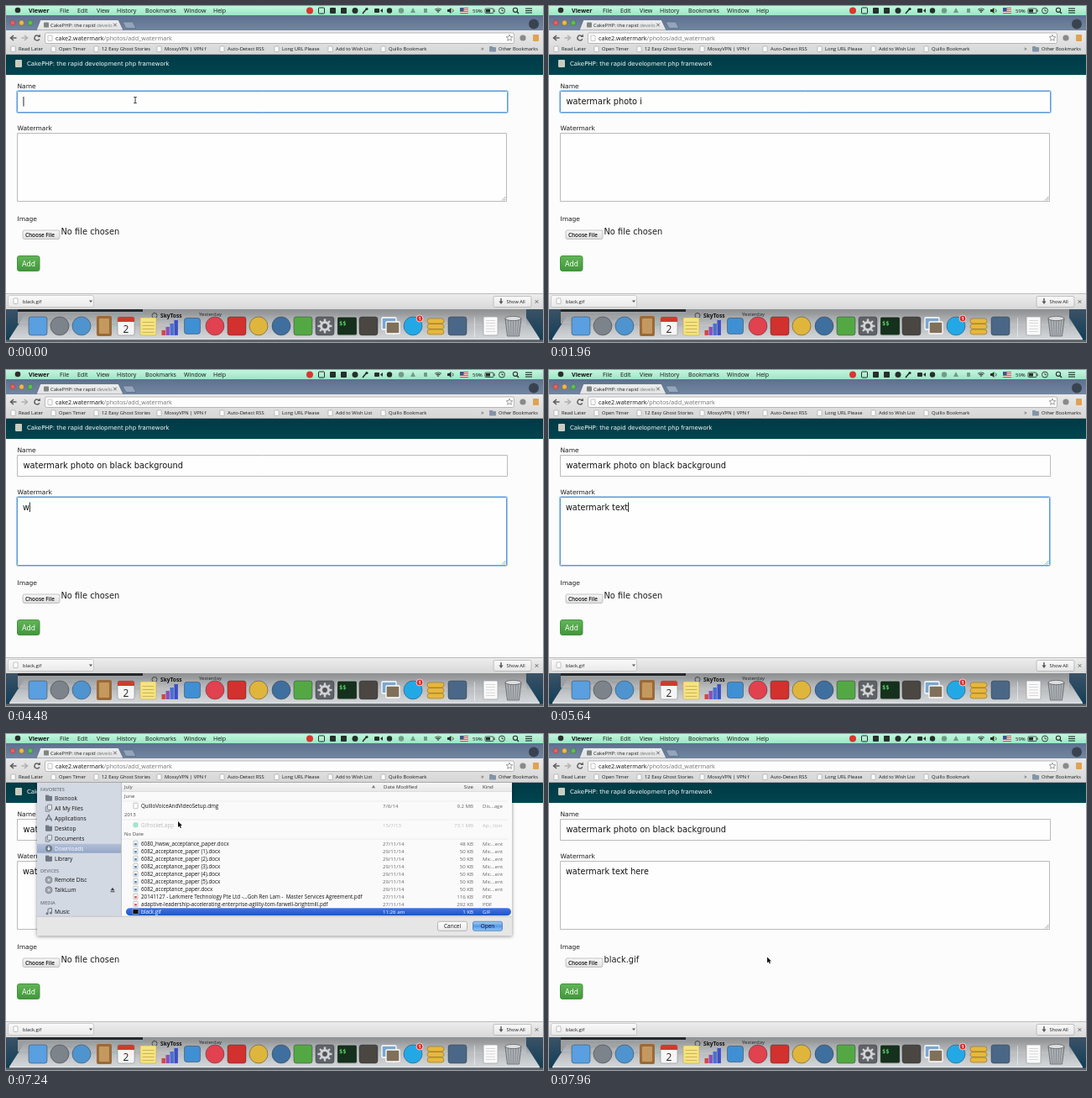
An HTML page with a canvas for the animation above (8000 ms loop, 640 by 400 pixels).

```html
<!DOCTYPE html>
<html lang="en">
<head>
<meta charset="utf-8">
<title>Add watermark</title>
<style>
html, body { margin: 0; width: 100%; height: 100%; overflow: hidden; background: #fcfcfc; }
canvas { display: block; width: 640px; height: 400px; }
</style>
</head>
<body>
<canvas id="stage"></canvas>
<script>
const LOOP = 8000;
const UI = '"Open Sans", sans-serif';
const PAGE = '"DejaVu Sans", sans-serif';
const canvas = document.getElementById('stage');
const ctx = canvas.getContext('2d');
const dpr = window.devicePixelRatio || 1;
canvas.width = 640 * dpr;
canvas.height = 400 * dpr;

// ---------- drawing helpers ----------
function grad(y0, y1, ...colors) {
  const g = ctx.createLinearGradient(0, y0, 0, y1);
  colors.forEach((c, i) => g.addColorStop(i / (colors.length - 1), c));
  return g;
}
function rect(x, y, w, h, fill) {
  ctx.fillStyle = fill;
  ctx.fillRect(x, y, w, h);
}
function paint(fill, stroke, lw) {
  if (fill) { ctx.fillStyle = fill; ctx.fill(); }
  if (stroke) { ctx.strokeStyle = stroke; ctx.lineWidth = lw; ctx.stroke(); }
}
function box(x, y, w, h, r, fill, stroke, lw = 1) {
  ctx.beginPath();
  ctx.roundRect(x, y, w, h, r);
  paint(fill, stroke, lw);
}
function disc(x, y, r, fill, stroke, lw = 1) {
  ctx.beginPath();
  ctx.arc(x, y, r, 0, 7);
  paint(fill, stroke, lw);
}
function poly(points, fill, stroke, lw = 1) {
  ctx.beginPath();
  points.forEach(([x, y]) => ctx.lineTo(x, y));
  if (fill) ctx.closePath();
  paint(fill, stroke, lw);
}
function arc(x, y, r, a, b, color, lw = 1) {
  ctx.beginPath();
  ctx.arc(x, y, r, a, b);
  paint(null, color, lw);
}
function text(s, x, y, size, color = '#1a1a1a', weight = 500, family = UI, align = 'left') {
  ctx.font = `${weight} ${size}px ${family}`;
  ctx.textAlign = align;
  ctx.fillStyle = color;
  ctx.fillText(s, x, y);
}
const pageText = (s, x, y, size, color = '#1c1c1c') => text(s, x, y, size, color, 400, PAGE);
function cross(x, y, r, color) {
  poly([[x - r, y - r], [x + r, y + r]], null, color);
  poly([[x + r, y - r], [x - r, y + r]], null, color);
}
function clipTo(x, y, w, h, draw) {
  ctx.save();
  ctx.beginPath();
  ctx.rect(x, y, w, h);
  ctx.clip();
  draw();
  ctx.restore();
}

// ---------- timing ----------
const clamp = (v, a = 0, b = 1) => Math.min(b, Math.max(a, v));
const smooth = p => p * p * (3 - 2 * p);
// keys: [time, value, value...]; eased between neighbours
function track(keys, t) {
  let i = 0;
  while (i < keys.length - 2 && t >= keys[i + 1][0]) i++;
  const a = keys[i], b = keys[i + 1];
  const p = smooth(clamp((t - a[0]) / (b[0] - a[0])));
  return a.slice(1).map((v, k) => v + (b[k + 1] - v) * p);
}
function typed(s, t, start, step, from = 0) {
  return s.slice(0, from + clamp(Math.floor((t - start) / step) + 1, 0, s.length - from));
}

const CLICK = 6720, LISTED = 7000, CLOSED = 7390;
const nameText = t => t < 2080
  ? typed('watermark photo i', t, 440, 93)
  : typed('watermark photo on black background', t, 2200, 83, 16);
const markText = t => typed('watermark text here', t, 4400, 93);
const sheetBottom = t => track([[6800, 58], [6994, 265], [7200, 265], [CLOSED, 58]], t)[0];

// ---------- menu bar ----------
function menuBar() {
  rect(0, 0, 640, 11, grad(0, 11, '#c2f6de', '#9ae8c4'));
  disc(14, 5, 3.3, '#2a2f2c');
  text('Viewer', 27, 8.3, 7.2, '#111', 700);
  [['File', 64], ['Edit', 85], ['View', 108], ['History', 132], ['Bookmarks', 166],
   ['Window', 212], ['Help', 247]].forEach(([s, x]) => text(s, x, 8.3, 7, '#111'));

  const ink = '#24302b';
  disc(362, 5.5, 4, '#d9362f');
  box(372.5, 2, 7, 7, 1, null, ink);
  box(386, 2, 7, 7, 1, ink);
  box(399, 2, 7, 7, 1, ink);
  disc(416, 5.5, 3.5, ink);
  poly([[425, 9], [430, 3]], null, ink, 1.6);
  disc(430, 3.5, 1.6, ink);
  box(439, 3, 6, 5, 1, ink);
  poly([[446, 5.5], [449, 3], [449, 8]], ink);
  disc(457, 5.5, 3.2, ink);
  disc(471, 5.5, 3.2, '#6f9c87');
  poly([[482, 8], [485, 2], [488, 8]], '#6f9c87');
  box(498, 3, 4, 5, 0.5, '#6f9c87');
  [1.5, 3.5, 5.5].forEach(r => arc(515, 8.5, r, -2.3, -0.84, ink, 1.1));
  poly([[526, 4], [528, 4], [530.5, 2], [530.5, 9], [528, 7], [526, 7]], ink);
  arc(530.5, 5.5, 2.5, -0.9, 0.9, ink, 0.8);
  rect(541, 2, 10, 7, '#f4f4f4');
  for (let i = 0; i < 4; i++) rect(541, 2 + i * 2, 10, 1, '#c4474a');
  rect(541, 2, 4.5, 4, '#3d5590');
  text('59%', 556, 7.8, 6, '#111');
  box(571, 3, 10, 5.5, 1, null, ink, 0.8);
  rect(572, 4, 5, 3.5, ink);
  rect(581.5, 4.5, 1, 2.5, ink);
  disc(591, 5.5, 3.5, null, ink, 0.9);
  poly([[591, 3.5], [591, 5.7], [593, 5.7]], null, ink, 0.8);
  disc(607, 4.8, 2.6, null, ink, 1.1);
  poly([[609, 6.8], [611, 9]], null, ink, 1.3);
  for (let i = 0; i < 3; i++) rect(619, 2.5 + i * 2.5, 8, 1.1, ink);
}

// ---------- browser frame ----------
function pageIcon(x, y) {
  box(x, y, 5, 6.5, 0.5, '#fff', '#9c9c9c', 0.6);
}
function browserFrame() {
  rect(0, 11, 640, 18, grad(11, 29, '#5d7090', '#73869f'));
  [['#ee5f56', 8], ['#f4b83d', 18.5], ['#5cc14a', 29]].forEach(([c, x]) =>
    disc(x, 20, 2.9, c, 'rgba(0,0,0,.3)', 0.6));
  poly([[36, 29], [41, 16.5], [134, 16.5], [140, 29]], grad(16, 29, '#eceeef', '#e2e2e2'), '#4f617c', 0.7);
  box(45, 19.5, 6, 6, 1, '#7f8682');
  text('CakePHP: the rapid', 53, 25, 6, '#222');
  const w = ctx.measureText('CakePHP: the rapid ').width;
  text('develo', 53 + w, 25, 6, '#777');
  cross(130, 22.5, 1.8, '#666');
  poly([[139, 19], [151, 19], [155, 26.5], [143, 26.5]], '#94a5bb', '#55677f', 0.7);
  disc(629, 21.5, 6, '#39434f');

  rect(0, 29, 640, 29, grad(29, 58, '#e9e9e9', '#d6d6d6'));
  const arrow = (x, d, c) => {
    poly([[x - 3.5 * d, 38], [x + 3.5 * d, 38]], null, c, 1.4);
    poly([[x, 35], [x + 3.5 * d, 38], [x, 41]], null, c, 1.4);
  };
  arrow(9, -1, '#555');
  arrow(22, 1, '#aeaeae');
  arc(37, 38, 3, 0.4, 5.5, '#555', 1.3);
  poly([[37.5, 36.8], [41, 37], [40.6, 33.6]], '#555');
  box(46.5, 32, 559, 12.5, 2, '#fdfdfd', '#a9a9a9', 0.8);
  pageIcon(50, 35);
  text('cake2.watermark', 59, 40.8, 7.2, '#1a1a1a');
  const host = ctx.measureText('cake2.watermark').width;
  text('/photos/add_watermark', 59 + host, 40.8, 7.2, '#757575');
  const star = Array.from({ length: 11 }, (_, i) => {
    const r = i % 2 ? 1.8 : 4, a = i * Math.PI / 5 - Math.PI / 2;
    return [600 + r * Math.cos(a), 38 + r * Math.sin(a)];
  });
  poly(star, null, '#888', 0.8);
  disc(616, 38, 3.6, '#8a8a8a');
  box(628, 34, 7, 8, 1, '#e0a253');

  [['Read Later', 15], ['Open Timer', 63], ['12 Easy Ghost Stories', 114], ['MossyVPN | VPN f', 189],
   ['Auto-Detect RSS', 264], ['Long URL Please', 329], ['Add to Wish List', 393],
   ['Quillo Bookmark', 456]].forEach(([s, x]) => {
    pageIcon(x - 9, 48);
    text(s, x, 53.4, 5.8);
  });
  text('»', 566, 53, 7, '#555');
  box(576, 49, 8, 5.5, 0.8, '#8494a8');
  rect(576, 48, 4, 1.5, '#8494a8');
  text('Other Bookmarks', 587, 53.4, 5.7);
  rect(0, 57, 640, 1, '#a5a8a9');
}

// ---------- web page ----------
function field(x, y, w, h, focused) {
  if (focused) {
    box(x - 0.5, y - 0.5, w + 1, h + 1, 2, null, 'rgba(100,160,225,.55)', 2.2);
    box(x, y, w, h, 1, '#fefefe', '#5c98d6', 1);
  } else {
    box(x, y, w, h, 0, '#fefefe', '#b4b4b4', 0.9);
  }
}
function page(t) {
  rect(0, 58, 640, 285, '#fcfcfc');
  rect(0, 58, 640, 24, grad(58, 82, '#003a45', '#00454f'));
  box(11, 64, 8, 9, 1, '#c9cdc0');
  pageText('CakePHP: the rapid development php framework', 25, 71.3, 6.95, '#fff');

  const inName = t < 4250;
  const inMark = !inName && t < CLICK;
  const caretOn = t % 1100 < 550;
  const name = nameText(t), mark = markText(t);
  pageText('Name', 13.5, 98, 7.5);
  field(13.5, 101.5, 584, 25, inName);
  pageText(name, 20.5, 117.3, 9.83, '#111');
  if (inName && caretOn) rect(20.5 + ctx.measureText(name).width, 108, 0.9, 11.5, '#111');

  pageText('Watermark', 13.5, 148, 7.5);
  field(13.5, 151.5, 583, 81, inMark);
  pageText(mark, 20, 166.8, 9.65, '#111');
  if (inMark && caretOn) rect(20 + ctx.measureText(mark).width, 157.5, 0.9, 11.5, '#111');
  for (const d of [2, 4.5]) poly([[595.5 - d, 231.5], [595.5, 231.5 - d]], null, '#888', 0.8);

  pageText('Image', 13.5, 256, 7.5);
  const pressed = t >= CLICK && t < 7080;
  box(20, 267, 44, 10.5, 2,
    pressed ? grad(267, 278, '#8fbcf0', '#3f80dc', '#7fb4f2') : grad(267, 278, '#f8f8f8', '#dedede'),
    pressed ? '#4573ad' : '#b4b4b4', 0.8);
  text('Choose File', 23, 274.6, 6.4, '#111', 600);
  pageText(t < CLOSED ? 'No file chosen' : 'black.gif', 65.5, 272.3, 9.85);

  box(13.5, 297.5, 26.5, 18, 2.5, grad(298, 316, '#62b457', '#3f9638'), '#3d8a37', 0.9);
  pageText('Add', 19, 309.8, 8.2, '#fff');
}
function downloadBar() {
  rect(0, 342, 640, 19, grad(342, 361, '#eeeeee', '#d8d8d8'));
  rect(0, 342, 640, 0.8, '#b0b0b0');
  box(2.5, 344.5, 102, 14, 2, grad(344, 359, '#fafafa', '#e9e9e9'), '#bcbcbc', 0.7);
  pageIcon(9, 348);
  text('black.gif', 20, 354, 5.8);
  poly([[99, 350.5], [103, 350.5], [101, 353]], '#555');
  box(581, 345.5, 45, 13, 2, grad(345, 359, '#fbfbfb', '#e6e6e6'), '#b2b2b2', 0.8);
  poly([[590, 348], [590, 353]], null, '#555', 1.4);
  poly([[587.5, 351.5], [592.5, 351.5], [590, 355]], '#555');
  text('Show All', 596.5, 354, 5.7);
  cross(632.5, 352, 1.8, '#666');
}

// ---------- open-file sheet, laid out with its bottom edge at 241 ----------
const SIDEBAR = [['FAVORITES', 67], ['Boxnook', 77], ['All My Files', 89], ['Applications', 101],
  ['Desktop', 113], ['Documents', 125], ['Downloads', 137], ['Library', 149],
  ['DEVICES', 164], ['Remote Disc', 174.5], ['TalkLum', 186.5], ['MEDIA', 201.5], ['Music', 212]];
const FILES = [
  ['6080_hwsw_acceptance_paper.docx', '27/11/14', '48 KB', 'Mic…ent'],
  ...[' (1)', ' (2)', ' (3)', ' (4)', ' (5)', ''].map(n =>
    [`6082_acceptance_paper${n}.docx`, '29/11/14', '50 KB', 'Mic…ent']),
  ['20141127 - Larkmere Technology Pte Ltd -…Goh Ren Lam -  Master Services Agreement.pdf', '27/11/14', '116 KB', 'PDF'],
  ['adaptive-leadership-accelerating-enterprise-agility-tom-farwell-brightmill.pdf', '27/11/14', '292 KB', 'PDF'],
  ['black.gif', '11:26 am', '1 KB', 'GIF']];

function fileRow([name, date, size, kind], y, color = '#111', dim = '#666') {
  text(name, 161, y + 2.3, 6.25, color);
  text(date, 449, y + 2.3, 6.1, dim);
  text(size, 557, y + 2.3, 6.1, dim, 500, UI, 'right');
  text(kind, 568, y + 2.3, 6.1, dim);
}
function fileList() {
  rect(138, 58, 465, 11, grad(58, 69, '#f6f6f6', '#e8e8e8'));
  rect(138, 69, 465, 0.6, '#cfcfcf');
  text('July', 141, 65.3, 6, '#444');
  poly([[436, 65], [440, 65], [438, 61.5]], '#777');
  text('Date Modified', 450, 65.3, 6.1, '#333');
  text('Size', 557, 65.3, 6.1, '#333', 500, UI, 'right');
  text('Kind', 568, 65.3, 6.1, '#333');
  [['June', 75], ['2013', 97], ['No Date', 120]].forEach(([s, y]) => {
    text(s, 141, y + 2.2, 6, '#444');
    rect(138, y + 5.5, 460, 0.5, '#dedede');
  });
  pageIcon(152, 83);
  fileRow(['QuilloVoiceAndVideoSetup.dmg', '7/6/14', '9.2 MB', 'Dis…age'], 86);
  disc(154.5, 109, 3.2, '#a5e3d2');
  fileRow(['Gifrocket.app', '15/7/13', '73.1 MB', 'Ap…tion'], 109, '#b9b9b9', '#bdbdbd');
  FILES.forEach((f, i) => {
    const y = 131.3 + i * 9, picked = i === FILES.length - 1;
    if (picked) {
      box(143, y - 4.4, 459, 9, 4.5, grad(y - 4, y + 4, '#3f74db', '#1f57c6'));
      box(151, y - 3, 7, 6, 0.5, '#111', '#fff', 0.5);
      return fileRow(f, y, '#fff', '#fff');
    }
    pageIcon(152, y - 3.3);
    rect(153.2, y - 0.5, 2.6, 2.4, f[3] === 'PDF' ? '#cc5a50' : '#4d83c2');
    fileRow(f, y);
  });
}
function sideIcon(name, x, y) {
  const c = '#6f7884';
  if (/Disc|TalkLum/.test(name)) {
    disc(x, y, 4, '#a3a9b0', c, 0.8);
    disc(x, y, 1.1, '#eee');
  } else if (name === 'Downloads') {
    disc(x, y, 4, c);
    poly([[x - 2, y], [x + 2, y], [x, y + 2.6]], '#fff');
    rect(x - 0.6, y - 2.5, 1.2, 3, '#fff');
  } else if (name === 'Music') {
    disc(x - 2, y + 2.5, 1.5, c);
    disc(x + 2.5, y + 1.8, 1.5, c);
    poly([[x - 1, y + 2], [x - 1, y - 3], [x + 3.5, y - 4], [x + 3.5, y + 1]], null, c, 1);
  } else if (name === 'Applications') {
    poly([[x - 3.5, y + 3.5], [x, y - 4], [x + 3.5, y + 3.5]], null, c, 1.3);
    rect(x - 4, y + 0.5, 8, 1.1, c);
  } else if (name === 'Documents' || name === 'All My Files') {
    box(x - 3.8, y - 2, 5, 6, 0.5, '#c7ccd3', c, 0.8);
    box(x - 1.5, y - 4, 5, 6, 0.5, '#dfe2e7', c, 0.8);
  } else {
    box(x - 4, y - 2.6, 8, 6, 0.8, c);
    rect(x - 4, y - 3.6, 4, 1.5, c);
  }
}
function sheet(t) {
  const bottom = sheetBottom(t);
  if (bottom <= 58.5) return;
  const loaded = t >= LISTED;
  clipTo(0, 58, 640, 285, () => {
    ctx.translate(0, bottom - 241);
    ctx.shadowColor = 'rgba(0,0,0,.45)';
    ctx.shadowBlur = 4 * dpr;
    ctx.shadowOffsetY = dpr;
    rect(37, 34, 566, 207, '#e6e6e7');
    ctx.shadowColor = 'transparent';
    rect(37, 34, 566, 24, grad(34, 58, '#f0f0f0', '#dcdcdc'));
    rect(37, 58, 100, 160, loaded ? '#d3d9e3' : '#dfe0e4');
    rect(138, 58, 465, 160, loaded ? '#fafafa' : '#e9e9ea');
    rect(137, 58, 0.8, 160, '#b7babf');
    if (loaded) rect(37, 131.5, 100, 11, grad(131, 143, '#b3c0d8', '#93a6c8'));
    clipTo(37, 58, 566, 159.5, () => {
      SIDEBAR.forEach(([s, y]) => {
        if (s === s.toUpperCase()) return text(s, 41, y + 2, 5.6, '#6b7480', 600);
        sideIcon(s, 51, y);
        text(s, 58, y + 2.5, 6.6, loaded && s === 'Downloads' ? '#fff' : '#111');
      });
      poly([[124.5, 187], [129.5, 187], [127, 183.5]], '#444');
      rect(124.5, 188, 5, 1, '#444');
      if (loaded) fileList();
    });
    rect(37, 217.5, 566, 0.8, '#bdbdbd');
    box(514.5, 224, 35, 11, 2, grad(224, 235, '#fff', '#ebebeb'), '#a5a5a5', 0.8);
    text('Cancel', 532, 231.8, 6.5, '#111', 500, UI, 'center');
    box(556.5, 224, 35, 11, 2, loaded ? grad(224, 235, '#a9cff7', '#5399e8', '#93c8fb') : '#ececec',
      loaded ? '#4a78b0' : '#c5c5c5', 0.8);
    text('Open', 574, 231.8, 6.5, loaded ? '#111' : '#7c7c7c', 500, UI, 'center');
  });
}

// ---------- desktop and dock ----------
function dockIcons() {
  const y = 381;
  const edge = 'rgba(40,45,50,.55)';
  const sq = (x, c, s = 22) => box(x - s / 2, y - s / 2, s, s, 3, c, edge, 0.8);
  const ball = (x, c) => disc(x, y, 11, c, edge, 0.8);
  sq(38, '#5a9fe0');
  ball(64, '#7d838a');
  ball(90, '#4f94cf');
  box(108, 369, 18, 24, 2, '#9a6a3a');
  box(111, 372, 12, 18, 1, '#c4995f');
  box(133, 370, 20, 22, 2, '#f6f6f6', '#888', 0.6);
  box(133, 370, 20, 6, [2, 2, 0, 0], '#cf3a32');
  text('2', 143, 388.5, 12, '#222', 400, UI, 'center');
  box(160, 371, 19, 21, 1, '#f5e382', '#b9a24a', 0.5);
  for (let i = 0; i < 4; i++) rect(162.5, 376 + i * 4, 14, 0.8, '#c4a945');
  ['#d8453e', '#8a4fc0', '#4a6fd0', '#3c4fc4'].forEach((c, i) =>
    rect(185.5 + i * 5, 386 - i * 4, 4.4, 6 + i * 4, c));
  sq(222, '#3f8fd4', 19);
  ball(249, '#e2414f');
  sq(275, '#d2312d');
  ball(301, '#e0b53c');
  ball(328, '#3f6f9f');
  sq(354, '#54a844');
  sq(380, '#5f6367');
  for (let i = 0; i < 8; i++) {
    const a = i * Math.PI / 4;
    poly([[380, y], [380 + 8.5 * Math.cos(a), y + 8.5 * Math.sin(a)]], null, '#d0d2d4', 2.4);
  }
  disc(380, y, 6, '#d0d2d4');
  disc(380, y, 3, '#555');
  box(394.5, 370, 24, 22, 2, '#15301c', '#b5b5b5', 1.2);
  text('$$', 397, 380, 7, '#5fd067', 700, '"DejaVu Sans Mono", monospace');
  sq(432, '#4a4642');
  box(448, 371, 17, 14, 1, '#7ba6cf', '#fff', 1.3);
  box(453, 376, 16, 14, 1, '#80705a', '#fff', 1.3);
  ball(485, '#23a8e6');
  disc(493, 372, 4, '#dc2d2a', '#fff', 0.7);
  text('1', 493, 374.3, 6, '#fff', 700, UI, 'center');
  [0, 1, 2].forEach(i => box(502, 385 - i * 6.5, 20, 6, 3, '#e6b73c', '#8f6c1a', 0.6));
  sq(538, '#4b6788');
  rect(558, 371, 0.8, 23, 'rgba(255,255,255,.6)');
  box(569, 370, 17, 22, 1, '#fafafa', '#999', 0.7);
  for (let i = 0; i < 5; i++) rect(572, 374 + i * 3.3, 11, 0.7, '#c9c9c9');
  poly([[595, 372], [614, 372], [611.5, 393], [597.5, 393]], 'rgba(170,175,180,.9)', '#555', 0.7);
  for (let i = 1; i < 6; i++) poly([[595 + i * 3.2, 373], [597.5 + i * 2.3, 392]], null, '#6f7377', 0.6);
  ctx.beginPath();
  ctx.ellipse(604.5, 372, 9.5, 2.6, 0, 0, 7);
  paint('#dcdee0', '#555', 0.7);
}
function desktop() {
  rect(0, 361, 640, 39, grad(361, 400, '#3b5266', '#0f3d56'));
  rect(14, 361, 149, 3, '#25282b');
  rect(14, 364, 149, 14, '#9b9ea1');
  text('downloads/dome', 42, 374, 6, '#444');
  rect(163, 361, 457, 20, grad(361, 381, '#8d8f91', '#b9bbbd'));
  poly([[22, 368], [618, 368], [636, 396], [4, 396]],
    grad(368, 396, 'rgba(160,163,166,.75)', 'rgba(196,198,200,.95)', 'rgba(222,223,224,.95)'));
  disc(177, 368.5, 3, null, '#444', 1);
  text('SkyToss', 184, 371.3, 6.6, '#111', 700);
  text('Yesterday', 230, 369.2, 6, '#222');
  rect(4, 396, 632, 1.5, '#e6e7e8');
  rect(0, 397.5, 640, 2.5, '#5c6268');
  dockIcons();
}

// ---------- pointer ----------
function pointer(t) {
  if (t >= 400 && t < 6160) return;
  const [x, y] = track([[6160, 154, 112], [6640, 54, 268], [6960, 54, 268], [7220, 205, 104],
    [7280, 205, 104], [7800, 260, 265.5]], t);
  const overField = y < 130 || (y > 151 && y < 233);
  if (t < CLICK && overField) {
    rect(x - 0.4, y - 3.5, 0.9, 7, '#222');
    rect(x - 1.8, y - 3.9, 3.6, 0.8, '#222');
    rect(x - 1.8, y + 3.1, 3.6, 0.8, '#222');
    return;
  }
  const shape = [[0, 0], [0, 7], [1.7, 5.5], [2.8, 8], [4, 7.5], [2.9, 5.1], [5, 5], [0, 0]]
    .map(([dx, dy]) => [x + dx, y + dy]);
  poly(shape, null, '#fff', 1.4);
  poly(shape, '#111');
}

function draw(now) {
  const t = now % LOOP;
  ctx.setTransform(dpr, 0, 0, dpr, 0, 0);
  desktop();
  page(t);
  sheet(t);
  browserFrame();
  downloadBar();
  menuBar();
  pointer(t);
}
const start = performance.now();
function loop() {
  draw(performance.now() - start);
  requestAnimationFrame(loop);
}
loop();
</script>
</body>
</html>
```
